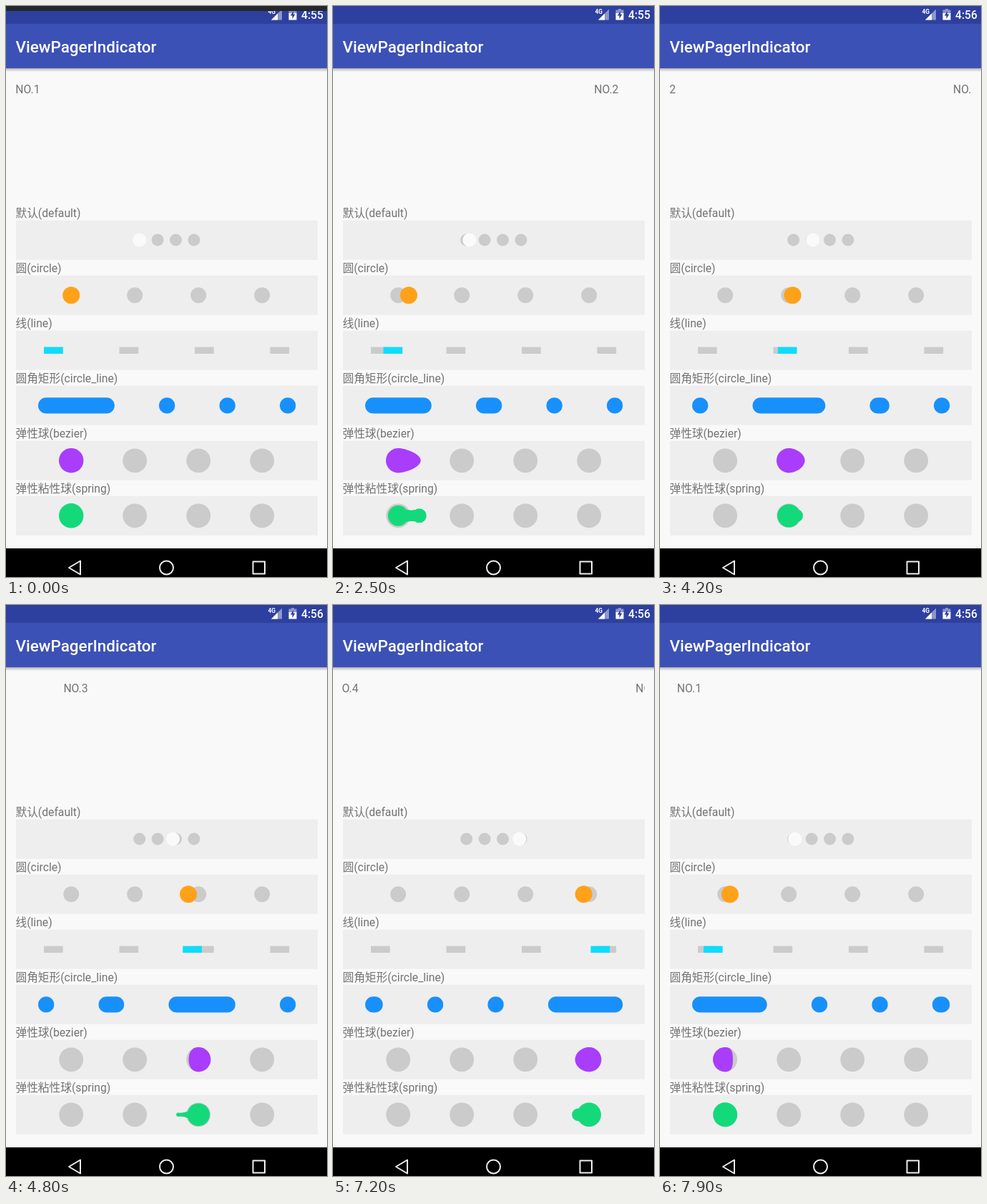
Animation, 449 px wide and 798 px high, one loop 8000 ms. Source, as an HTML page:

```html
<!DOCTYPE html>
<html lang="zh">
<head>
<meta charset="utf-8">
<title>ViewPagerIndicator</title>
<style>
html, body { margin: 0; width: 100%; height: 100%; overflow: hidden; background: #f9f9f9; }
svg { display: block; width: 100vw; height: 100vh; }
text { font: 15.7px Roboto, "Noto Sans CJK SC", "Noto Sans CJK", sans-serif; fill: #737373; }
.title { font-size: 22.45px; font-weight: 500; fill: #fff; }
.clock { font-weight: 500; fill: #fff; }
.net { font-size: 9px; font-weight: 700; fill: #fff; }
</style>
</head>
<body>
<svg id="stage" viewBox="0 0 449 798">
  <defs>
    <linearGradient id="shade" x2="0" y2="1">
      <stop stop-color="#000" stop-opacity=".28"/>
      <stop offset="1" stop-color="#000" stop-opacity="0"/>
    </linearGradient>
    <clipPath id="pager"><rect x="13" y="95" width="423" height="180"/></clipPath>
  </defs>
  <rect width="449" height="798" fill="#f9f9f9"/>
  <rect width="449" height="25.5" fill="#2e409f"/>
  <rect y="25" width="449" height="62" fill="#3c51b5"/>
  <rect y="87" width="449" height="5" fill="url(#shade)"/>
  <text class="title" x="13.5" y="65">ViewPagerIndicator</text>

  <text class="net" x="366.5" y="11" textLength="10.5" lengthAdjust="spacingAndGlyphs">4G</text>
  <path d="M371 19.5L386 4.500V19.500Z" fill="#8d97cb"/>
  <path d="M371 19.500L380 10.500V19.500Z" fill="#fff"/>
  <path d="M395.500 5.500H399V4H403V5.500H406.500V11H395.500Z" fill="#8d97cb"/>
  <path d="M395.500 10H406.500V19.500H395.500Z" fill="#fff"/>
  <path d="M402 7L397.800 13.500H400.500V18L404.500 11.500H402Z" fill="#2e409f"/>
  <text class="clock" id="clock" x="413" y="18.3"></text>
  <rect id="strip" width="449" height="7" fill="#24272c"/>

  <g clip-path="url(#pager)">
    <text id="page" y="122"></text>
    <text id="nextPage" y="122"></text>
  </g>
  <g id="rows"></g>

  <rect y="758" width="449" height="40" fill="#000"/>
  <g fill="none" stroke="#eee" stroke-width="2" stroke-linejoin="round">
    <path d="M88 785L104 775.500V794.500Z"/>
    <circle cx="224.500" cy="785" r="9.500"/>
    <rect x="345.500" y="776.500" width="16.500" height="17"/>
  </g>
</svg>
<script>
const LOOP = 8000, STEP = 100, COUNT = 4;
const PAGE_X = 14, PAGE_W = 422;
const GRAY = '#cbcbcb', BALL = 17.2;

// [time, pager position]; 4 is the first page again
const SCROLL = [
  [0, 0], [1300, 0], [1600, .015], [1700, .015], [2100, .03], [2200, .03],
  [2400, .1], [2500, .166], [2700, .34], [2900, .56], [3100, .82], [3200, .9455],
  [3300, .982], [3400, .994], [3600, 1],
  [4000, 1], [4200, 1.06], [4300, 1.14], [4400, 1.25], [4800, 1.841], [4900, 1.955], [5000, 1.99], [5100, 2],
  [5400, 2], [5500, 2.015], [5600, 2.015], [5700, 2.22], [5800, 2.58], [5900, 2.891],
  [6000, 2.96], [6100, 2.986], [6300, 3],
  [7100, 3], [7200, 3.0284], [7300, 3.085], [7400, 3.2], [7500, 3.35], [7700, 3.71], [7800, 3.88], [7900, 3.975], [8000, 4]
];

const $ = id => document.getElementById(id);
const lerp = (a, b, k) => a + (b - a) * k;
const indices = [...Array(COUNT).keys()];

function add(tag, attrs, text = '') {
  const el = document.createElementNS('http://www.w3.org/2000/svg', tag);
  set(el, attrs);
  el.textContent = text;
  return $('rows').appendChild(el);
}
function set(el, attrs) {
  for (const key in attrs) el.setAttribute(key, attrs[key]);
}

['默认(default)', '圆(circle)', '线(line)', '圆角矩形(circle_line)', '弹性球(bezier)', '弹性粘性球(spring)']
  .forEach((label, i) => {
    add('text', { x: 13.5, y: 295 + 77 * i }, label);
    add('rect', { x: 14, y: 299.7 + 77 * i, width: 422, height: 55, fill: '#eee' });
  });

const dotX = i => 186.7 + 25.4 * i;
const ballX = i => 91.2 + 89 * i;
const barX = i => 53 + 105.5 * i;

function dots(x, cy, r) {
  indices.forEach(i => add('circle', { cx: x(i), cy, r, fill: GRAY }));
}
const bar = (x, fill) => add('rect', { x, y: 476.6, width: 26.7, height: 9.4, fill });

dots(dotX, 327, 8.5);
dots(ballX, 404.2, 11);
indices.forEach(i => bar(barX(i), GRAY));
dots(ballX, 635.3, 16.9);
dots(ballX, 712.3, 16.9);

const dot = add('circle', { cy: 327, r: 9.6, fill: '#fafafa' });
const circle = add('circle', { cy: 404.2, r: 12, fill: '#ffa21a' });
const line = bar(0, '#0fdcfb');
const pills = indices.map(() => add('rect', { y: 547.2, height: 22.4, rx: 11.2, fill: '#1890fb' }));
const blob = add('path', { fill: '#a93dfb' });
const spring = add('path', { fill: '#14d97b' });

function positionAt(t) {
  const n = Math.max(1, SCROLL.findIndex(([time]) => time > t));
  const [t0, a] = SCROLL[n - 1], [t1, b] = SCROLL[n];
  return lerp(a, b, (t - t0) / (t1 - t0));
}

// Left and right edge of a pill while the given one is long
function pillSpan(i, active) {
  const left = 45 + 84.5 * (i + (i > active));
  return [left, left + 22.3 + (i === active ? 84.5 : 0)];
}

function blobPath(from, to, f) {
  const cy = 635.3, dir = Math.sign(to - from);
  const cx = lerp(from, to, Math.min(1, Math.max(0, (f - .2) / .6)));
  const bulge = Math.max(0, 1 - Math.abs(f - .5) / .3);
  let lead = 1 + bulge, trail = 1 + bulge;
  if (f <= .2) lead = 1 + f / .2;
  else if (f <= .5) lead = 2;
  else if (f > .8) trail = 1 - (f - (f > .9 ? .9 : .8)) * 5;
  const h = BALL * (1 - .1 * bulge);
  const c = BALL * .5519 * (1 + .3 * bulge);
  const front = cx + dir * BALL * lead, back = cx - dir * BALL * trail;
  const top = cy - h, bottom = cy + h, near = cx - dir * c, far = cx + dir * c;
  return `M${cx} ${top}C${far} ${top} ${front} ${cy - c} ${front} ${cy}` +
    `S${far} ${bottom} ${cx} ${bottom}` +
    `C${near} ${bottom} ${back} ${cy + c} ${back} ${cy}S${near} ${top} ${cx} ${top}Z`;
}

const disc = (x, y, r) => `M${x - r} ${y}a${r} ${r} 0 1 1 ${2 * r} 0a${r} ${r} 0 1 1 ${-2 * r} 0Z`;

function springPath(from, to, f) {
  const cy = 712.3;
  if (!f) return disc(from, cy, BALL);
  const head = lerp(from, to, Math.min(1, f * 2));
  const foot = lerp(from, to, Math.max(0, f * 2 - 1));
  const headR = BALL * (.5 + .5 * f), footR = BALL * (1 - f);
  const mid = (head + foot) / 2, neck = .35 * Math.min(headR, footR);
  // Wind the neck like the discs so that the overlaps stay filled
  const s = Math.sign(head - foot);
  return disc(head, cy, headR) + disc(foot, cy, footR) +
    `M${foot} ${cy - s * footR}Q${mid} ${cy - s * neck} ${head} ${cy - s * headR}` +
    `V${cy + s * headR}Q${mid} ${cy + s * neck} ${foot} ${cy + s * footR}Z`;
}

function draw(t) {
  const p = positionAt(t), i = Math.floor(p), f = p - i, next = (i + 1) % COUNT;
  const at = lerp(i, next, f);

  $('page').textContent = `NO.${i + 1}`;
  $('nextPage').textContent = `NO.${next + 1}`;
  set($('page'), { x: PAGE_X - .7 - f * PAGE_W });
  set($('nextPage'), { x: PAGE_X - .7 + (1 - f) * PAGE_W });
  $('clock').textContent = t < 3400 ? '4:55' : '4:56';
  set($('strip'), { opacity: t < STEP ? 1 : 0 });

  set(dot, { cx: dotX(at) });
  set(circle, { cx: ballX(at) });
  set(line, { x: barX(at) });
  pills.forEach((pill, n) => {
    const a = pillSpan(n, i), b = pillSpan(n, next);
    const x = lerp(a[0], b[0], f);
    set(pill, { x, width: lerp(a[1], b[1], f) - x });
  });
  set(blob, { d: blobPath(ballX(i), ballX(next), f) });
  set(spring, { d: springPath(ballX(i), ballX(next), f) });
}

const start = performance.now();
function tick() {
  const t = (performance.now() - start) % LOOP;
  draw(Math.floor(t / STEP) * STEP);
  requestAnimationFrame(tick);
}
tick();
</script>
</body>
</html>
```
